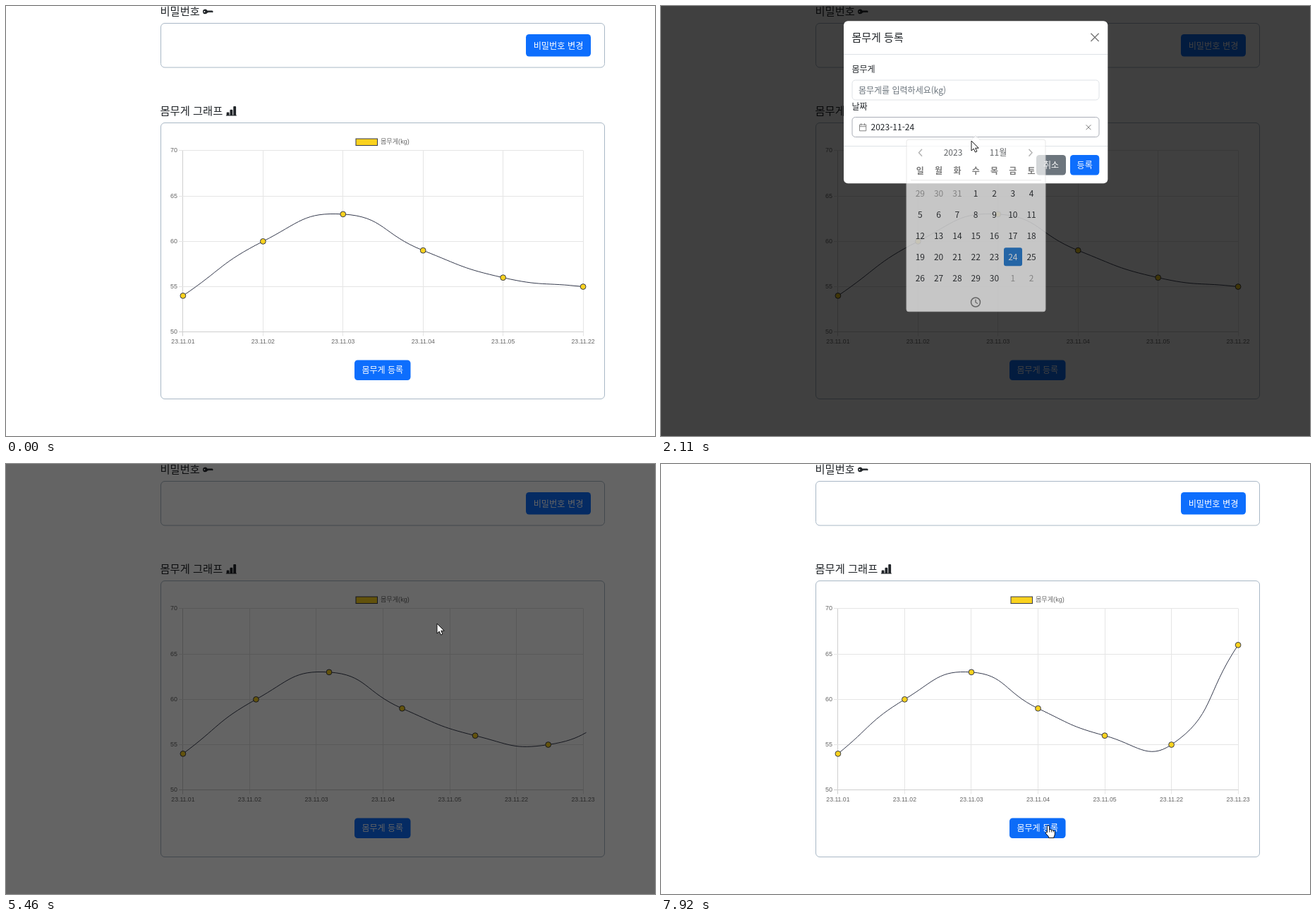
Animation, 920 px wide and 609 px high, one loop 7.99 s. Source, as an HTML page:

```html
<!DOCTYPE html>
<html lang="ko">
<head>
<meta charset="utf-8">
<title>몸무게 그래프</title>
<style>
html, body { margin: 0; width: 100%; height: 100%; overflow: hidden; background: #fff; }
svg { display: block; width: 920px; height: 609px; }
text { font-family: "Noto Sans CJK KR", "Noto Sans CJK", "Noto Sans", sans-serif; white-space: pre; }
.ax { font-family: "Liberation Sans", "Noto Sans CJK KR", "Noto Sans CJK", sans-serif; }
</style>
</head>
<body>
<svg id="stage" viewBox="0 0 920 609"></svg>
<script>
const LOOP = 7990;
const BLUE = '#0d6efd', DARK = '#212529', YELLOW = '#fad21e', LINE = '#363b4e';
const $ = id => document.getElementById(id);
const clamp = v => Math.max(0, Math.min(1, v));
const ramp = (t, start, dur) => clamp((t - start) / dur);
const smooth = p => p * p * (3 - 2 * p);
const mix = (a, b, p) => a + (b - a) * p;

// Text placed by its vertical centre
const txt = (x, yc, s, size = 12, fill = DARK, more = '') =>
  `<text x="${x}" y="${yc + size * 0.37}" font-size="${size}" fill="${fill}" ${more}>${s}</text>`;
const MID = 'text-anchor="middle"', MED = 'font-weight="500"';
const rect = (x, y, w, h, r, fill, more = '') =>
  `<rect x="${x}" y="${y}" width="${w}" height="${h}" rx="${r}" fill="${fill}" ${more}/>`;
const path = (d, stroke, w = 1, more = '') =>
  `<path d="${d}" fill="none" stroke="${stroke}" stroke-width="${w}" ${more}/>`;
const button = (x, y, w, h, label, size, fill = BLUE, id = '') =>
  rect(x, y, w, h, 4.5, fill) +
  (id ? rect(x, y, w, h, 4.5, '#0b5ed7', `id="${id}" opacity="0"`) : '') +
  txt(x + w / 2, y + h / 2 + 0.3, label, size, '#fff', `${MID} ${MED}`);

// Page
const card = (y, h) => rect(219.5, y, 629, h, 5.5, '#fff', 'stroke="#a9b8c6"');
const KEY = 'M3.5 11.5a3.5 3.5 0 1 1 3.163-5H14L15.5 8 14 9.5l-1-1-1 1-1-1-1 1-1-1-1 1H6.663a3.5 3.5 0 0 1-3.163 2zM2.5 9a1 1 0 1 0 0-2 1 1 0 0 0 0 2z';
const BARS = 'M11 2a1 1 0 0 1 1-1h2a1 1 0 0 1 1 1v12h.5a.5.5 0 0 1 0 1H.5a.5.5 0 0 1 0-1H1v-3a1 1 0 0 1 1-1h2a1 1 0 0 1 1 1v3h1V7a1 1 0 0 1 1-1h2a1 1 0 0 1 1 1v7h1z';
const icon = (d, x, y) => `<path d="${d}" fill="${DARK}" transform="translate(${x} ${y}) scale(.96)"/>`;
const page =
  txt(218.5, 7.3, '비밀번호', 15.3) + icon(KEY, 279, 0.3) + card(24.5, 62.5) +
  button(737, 40, 92, 31.5, '비밀번호 변경', 12.2) +
  txt(218.5, 148, '몸무게 그래프', 15.3) + icon(BARS, 311.7, 141) + card(165.5, 391) +
  rect(496, 188, 30.5, 9.5, 0, YELLOW, `stroke="${LINE}"`) +
  txt(531, 191.8, '몸무게(kg)', 9.1, '#666', 'class="ax"') +
  '<g id="chart"></g>' +
  button(494, 501.5, 79.5, 28.5, '몸무게 등록', 12, BLUE, 'pageHover');

// Tooltip of the last point
const tip = `<g id="tip" opacity="0">` +
  rect(739, 238.5, 74, 35, 4.5, 'rgba(0,0,0,.8)') +
  '<path d="M813 252l4 4-4 4z" fill="rgba(0,0,0,.8)"/>' +
  txt(743.5, 247.6, '23.11.23', 8.8, '#fff', 'class="ax" font-weight="700"') +
  rect(744, 260, 8, 8, 0, YELLOW, 'stroke="#fff" stroke-width=".8"') +
  txt(754.5, 263.4, '몸무게(kg): 66', 8.8, '#fff', 'class="ax"') + '</g>';

// Dialog
const cross = (x, y, r, c, w) => path(`M${x - r} ${y - r}L${x + r} ${y + r}M${x + r} ${y - r}L${x - r} ${y + r}`, c, w);
const field = (y, id) => rect(271, y, 350, 28, 4.5, '#fff', `id="${id}" stroke="#dee2e6"`);
const dialog = `<g id="dialog">` +
  rect(259, 21.2, 374.3, 230, 6, '#fff') +
  path('M259 68.5H633M259 198.5H633', '#dee2e6') +
  txt(270.5, 44.8, '몸무게 등록', 15, DARK, MED) + cross(615, 44.3, 5.6, '#777', 1.4) +
  txt(270.5, 90, '몸무게') +
  rect(269.5, 103.5, 353, 31, 6, 'none', 'id="ring" stroke="#0d6efd" stroke-opacity=".25" stroke-width="3" opacity="0"') +
  field(105, 'weight') +
  `<text id="value" x="280" y="123.8" font-size="12"></text>` +
  path('M0 112.5V126', DARK, 1, 'id="caret"') +
  `<g id="spin">${rect(600, 112, 12, 15.5, 1, '#efefef')}<path d="M603 117.3l3-3.3 3 3.3zM603 122.2l3 3.3 3-3.3z" fill="#444"/></g>` +
  txt(270.5, 142.8, '날짜') + field(157.5, 'date') +
  path('M281.5 168h9.2v8.8h-9.2zM281.5 170.7h9.2M283.7 166.2v3M288.5 166.2v3', '#777', 0.9) +
  `<text id="day" x="297.5" y="176.4" font-size="12" fill="${DARK}"></text>` +
  cross(606, 171.8, 3.4, '#777', 1) +
  button(532, 211, 42, 28.5, '취소', 12, '#6c757d') +
  button(580, 211, 41.3, 28.5, '등록', 12, BLUE, 'saveHover') + '</g>';

// Calendar
const colX = i => 367.3 + 26.3 * i, rowY = i => 265.2 + 30.15 * i;
function calendar() {
  let s = rect(348, 189, 197, 243.5, 3, '#fff', 'stroke="#ddd"') +
    '<path d="M440 190l6-6.5 6 6.5z" fill="#fff"/>' + path('M440 189l6-6 6 6', '#ddd') +
    path('M370 202.5l-4.5 5 4.5 5M521.5 202.5l4.5 5-4.5 5', '#959595', 1.5) +
    txt(414, 207.8, '2023', 12, DARK, MID) + txt(478, 207.8, '11월', 12, DARK, MID) +
    path('M354 246.5H539', '#ddd') +
    rect(459.3, rowY(3) - 13.3, 26, 26, 3, '#f3f3f3', 'id="dayHover"') +
    rect(486, rowY(3) - 13.5, 26, 26, 3, '#1976d2');
  [...'일월화수목금토'].forEach((c, i) => s += txt(colX(i), 233.3, c, 12, '#444', `${MID} font-weight="700"`));
  for (let i = 0; i < 35; i++) {
    const d = i - 2, out = d < 1 || d > 30;
    const n = d < 1 ? d + 31 : d > 30 ? d - 30 : d;
    s += txt(colX(i % 7), rowY(Math.floor(i / 7)), n, 12, d === 24 ? '#fff' : out ? '#a0a0a0' : DARK, MID);
  }
  return s + '<circle cx="446" cy="419.3" r="6.5" fill="none" stroke="#777" stroke-width="1.5"/>' +
    path('M446 415.2v4.3l3 1.8', '#777', 1.3);
}

const cursors = {
  arrow: '<path d="M0 0V14L3.2 11.1L5.5 16L7.9 15L5.7 10.2H10.2Z" fill="#fff" stroke="#000" stroke-width=".9"/>',
  hand: '<path d="M-1.6 9V1Q-1.6-.6 0-.6T1.6 1V5.6Q2.2 4.8 3.2 5T4.4 6.3Q5.2 5.5 6 5.9T7 7.1Q8 6.5 8.7 7T9.3 8.4V11.5Q9.3 13.5 8 15.5V17H.6V15.5L-3.6 10.6Q-4 9-2.8 8.6T-1.6 9.6Z" fill="#fff" stroke="#000" stroke-width=".9"/>' +
    path('M1.6 5.6V9M4.4 6.5V9M7 7.3V9', '#000', 0.8),
  beam: path('M-2.6-6.5H-.8L0-5.8L.8-6.5H2.6M0-5.8V5.8M-2.6 6.5H-.8L0 5.8L.8 6.5H2.6', '#222', 1.1)
};

$('stage').innerHTML =
  '<defs><clipPath id="area"><rect x="247" y="200" width="575.5" height="266"/></clipPath></defs>' +
  page + tip + '<rect id="shade" width="920" height="609"/>' + dialog +
  `<g id="cal">${calendar()}</g>` +
  Object.keys(cursors).map(k => `<g id="${k}">${cursors[k]}</g>`).join('');

// Chart
const LEFT = 250.9, WIDTH = 567.2, BASE = 461.7, UNIT = 12.835;
const DAYS = ['01', '02', '03', '04', '05', '22', '23'];
const KILOS = [54, 60, 63, 59, 56, 55, 66];
const yOf = kg => BASE - (kg - 50) * UNIT;
const NEW_DATA = 5292;

function curve(pts) {
  const ctl = pts.map((c, i) => {
    const a = pts[i - 1] || c, b = pts[i + 1] || c;
    const da = Math.hypot(c[0] - a[0], c[1] - a[1]), db = Math.hypot(b[0] - c[0], b[1] - c[1]);
    const at = f => [c[0] + f * (b[0] - a[0]), c[1] + f * (b[1] - a[1])];
    return [at(-0.5 * da / (da + db)), at(0.5 * db / (da + db))];
  });
  return pts.map((p, i) => i ? `C${ctl[i - 1][1]} ${ctl[i][0]} ${p}` : `M${p}`).join('');
}

let drawn = null;
function drawChart(t) {
  const p = 1 - Math.pow(1 - ramp(t, NEW_DATA, 1000), 4);
  const n = t < NEW_DATA ? 6 : 7, key = n + ':' + p;
  if (key === drawn) return;
  drawn = key;
  let s = '';
  for (let i = 0; i < n; i++) {
    const x = LEFT + WIDTH * i / (n - 1), gx = Math.floor(x) + 0.5;
    s += path(`M${gx} 205V467.5`, i ? '#e5e5e5' : '#cfcfcf') +
      txt(x, 475, '23.11.' + DAYS[i], 8.7, '#666', `class="ax" ${MID}`);
  }
  for (let kg = 50; kg <= 70; kg += 5) {
    const y = Math.floor(yOf(kg)) + 0.5;
    s += path(`M245 ${y}H818.5`, kg > 50 ? '#e5e5e5' : '#cfcfcf') +
      txt(243, y - 0.6, kg, 9, '#666', 'class="ax" text-anchor="end"');
  }
  const pts = KILOS.slice(0, n).map((kg, i) => [
    LEFT + WIDTH * i * mix(1 / 5, 1 / 6, p),
    i === 6 ? mix(BASE, yOf(kg), p) : yOf(kg)
  ]);
  s += path(curve(pts), LINE, 1, 'clip-path="url(#area)"');
  for (const [x, y] of pts)
    if (x < LEFT + WIDTH + 0.6) s += `<circle cx="${x}" cy="${y}" r="3.9" fill="${YELLOW}" stroke="${LINE}"/>`;
  $('chart').innerHTML = s;
}

// Pointer: time, x, y
const MOVES = [
  [200, 797, 602], [960, 547, 522], [1380, 547, 522], [1960, 446, 176], [2110, 440, 191],
  [2600, 467, 359], [2670, 470, 361], [2810, 470, 361], [3160, 426, 121], [4300, 426, 121],
  [4850, 611, 226], [5460, 611, 226], [6440, 817, 253], [7380, 817, 253], [7920, 549, 512.5]
];
const KINDS = [
  [0, ''], [200, 'arrow'], [840, 'hand'], [1000, 'arrow'], [1860, 'hand'], [2060, 'arrow'],
  [2300, 'hand'], [2840, 'arrow'], [3080, 'beam'], [4030, ''], [4300, 'beam'], [4400, 'arrow'],
  [4760, 'hand'], [5250, 'arrow'], [7880, 'hand']
];
function pointer(t) {
  let i = 0;
  while (i < MOVES.length - 2 && t >= MOVES[i + 1][0]) i++;
  const a = MOVES[i], b = MOVES[i + 1], p = smooth(ramp(t, a[0], b[0] - a[0]));
  const kind = KINDS.filter(k => t >= k[0]).pop()[1];
  for (const k in cursors) {
    show(k, k === kind);
    set(k, 'transform', `translate(${mix(a[1], b[1], p)} ${mix(a[2], b[2], p)})`);
  }
}

const set = (id, name, v) => $(id).setAttribute(name, v);
const fade = (id, v) => set(id, 'opacity', v);
const show = (id, on) => set(id, 'visibility', on ? 'visible' : 'hidden');
const label = (id, s) => { if ($(id).textContent !== s) $(id).textContent = s; };

function render(t) {
  drawChart(t);
  pointer(t);

  // Two stacked half-dark layers
  const dim = 0.5 * Math.min(ramp(t, 973, 150), 1 - ramp(t, 5423, 150));
  fade('shade', 1 - (1 - dim) ** 2);

  const OPEN = 1123, CLOSE = 5115;
  const inP = 1 - (1 - ramp(t, OPEN, 300)) ** 2, outP = 1 - (1 - ramp(t, CLOSE, 300)) ** 2;
  fade('dialog', Math.min(ramp(t, OPEN, 150), 1 - ramp(t, CLOSE, 150)));
  set('dialog', 'transform', `translate(0 ${-37.5 * (1 - inP + outP)})`);

  const cal = Math.min(ramp(t, 2041, 100), 1 - ramp(t, 2800, 100));
  fade('cal', cal);
  set('cal', 'transform', `translate(0 ${5 - 16 * (1 - cal)})`);
  fade('dayHover', t > 2560 ? 1 : 0);
  set('date', 'stroke', t > 1840 && t < 2810 ? '#aaaeb7' : '#dee2e6');
  label('day', t < 2810 ? '2023-11-24' : '2023-11-23');

  const typed = t < 4030 ? '' : t < 4100 ? '6' : '66';
  label('value', typed || '몸무게를 입력하세요(kg)');
  set('value', 'fill', typed ? DARK : '#6c757d');
  const focus = Math.min(ramp(t, 3470, 150), 1 - ramp(t, 5050, 150));
  fade('ring', focus);
  set('weight', 'stroke', focus > 0.5 ? '#86b7fe' : '#dee2e6');
  fade('caret', (t > 3490 && t < 4020) || (t >= 4030 && t < 4600) ? 1 : 0);
  set('caret', 'transform', `translate(${280.5 + 6.7 * typed.length} 0)`);
  fade('spin', t > 3080 && t < 5050 ? 1 : 0);

  fade('saveHover', ramp(t, 4740, 150));
  fade('pageHover', t < 5000 ? Math.min(ramp(t, 820, 150), 1 - ramp(t, 960, 130)) : ramp(t, 7900, 150));
  fade('tip', Math.min(ramp(t, 6468, 200), 1 - ramp(t, 7420, 200)));
}

const begin = performance.now();
function tick() {
  render((performance.now() - begin) % LOOP);
  requestAnimationFrame(tick);
}
tick();
</script>
</body>
</html>
```
